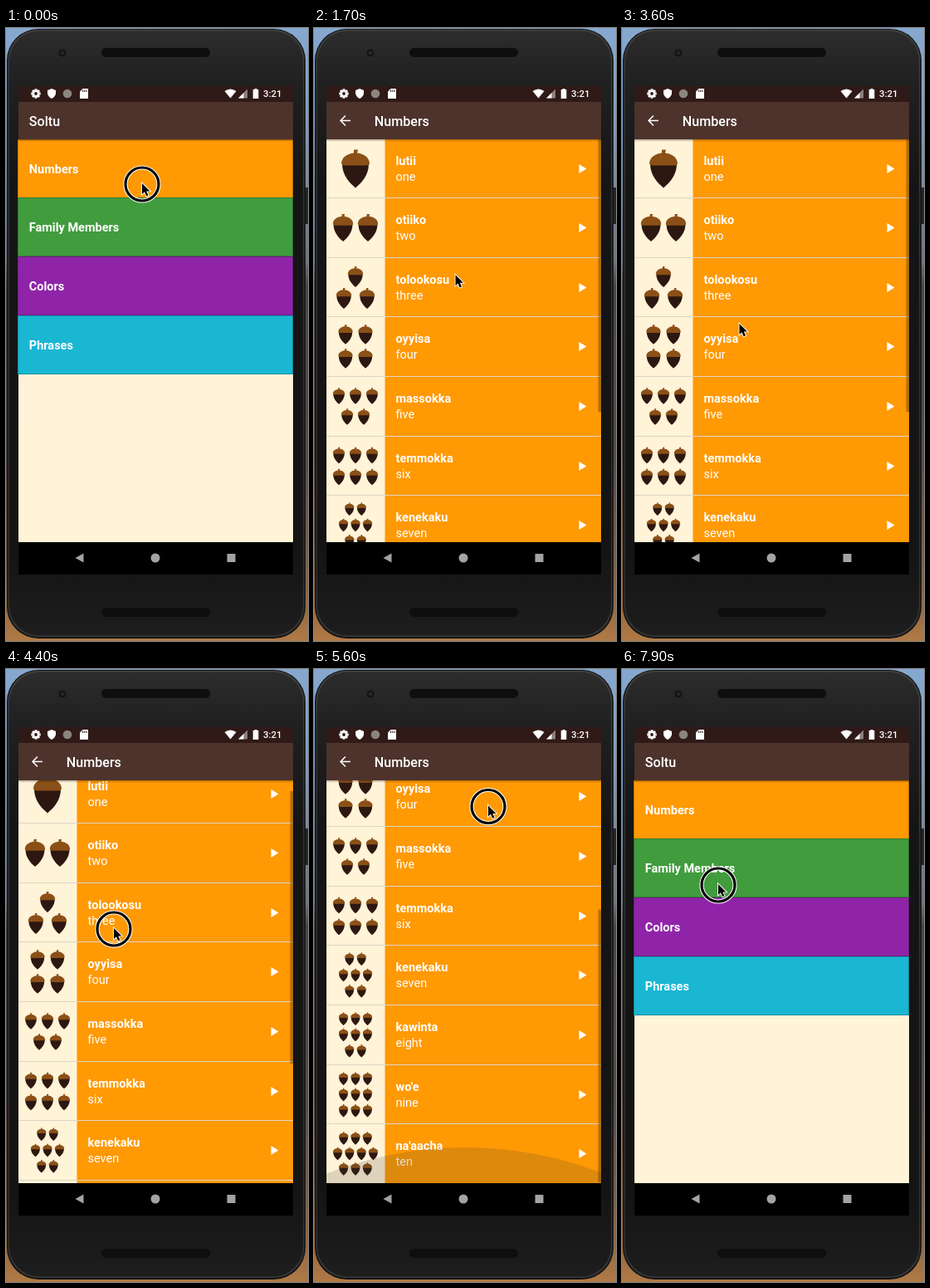
Recreate the animation shown at these times as an HTML page with a canvas. Size 364 px wide and 738 px high, loop 8 s.

```html
<!DOCTYPE html>
<html lang="en">
<head>
<meta charset="utf-8">
<title>Vocabulary app</title>
<style>
html, body { margin: 0; width: 100%; height: 100%; overflow: hidden; background: #1b1b1b; }
canvas { display: block; width: 364px; height: 738px; }
</style>
</head>
<body>
<canvas id="stage"></canvas>
<script>
const W = 364, H = 738, LOOP = 8000, STEP = 100;
const canvas = document.getElementById('stage');
const dpr = window.devicePixelRatio || 1;
canvas.width = W * dpr;
canvas.height = H * dpr;
const c = canvas.getContext('2d');

// Screen geometry
const LEFT = 15, RIGHT = 346, WIDTH = RIGHT - LEFT;
const STATUS = 70, BAR = 89, TOP = 134, BOTTOM = 619, END = 658;
const ROW = 71.65, VIEW = BOTTOM - TOP;
const ORANGE = '#ff9904', CREAM = '#fff3d8';

const menu = [
  ['Numbers', ORANGE], ['Family Members', '#419c3e'],
  ['Colors', '#9024a9'], ['Phrases', '#1ab7d3']
];

// word, meaning, acorns per line, acorn height, column pitch, line pitch
const words = [
  ['lutii', 'one', '1', 46, 0, 0],
  ['otiiko', 'two', '2', 33, 30, 0],
  ['tolookosu', 'three', '12', 25, 28, 26],
  ['oyyisa', 'four', '22', 23.5, 24, 29],
  ['massokka', 'five', '32', 19.5, 20, 25],
  ['temmokka', 'six', '33', 19.5, 20, 26],
  ['kenekaku', 'seven', '232', 15.5, 14.5, 19.3],
  ['kawinta', 'eight', '332', 15.5, 14.5, 19.3],
  ["wo'e", 'nine', '333', 15.5, 14.5, 19.3],
  ["na'aacha", 'ten', '343', 15.5, 14.3, 18.5]
];

// time, pointer x, pointer y
const path = [
  [0, 164, 187], [1100, 164, 187], [2200, 176, 389], [3000, 176, 389],
  [3800, 130, 345], [4150, 130, 340], [4400, 130, 312], [4800, 128, 215],
  [5200, 210, 300], [5300, 210, 290], [5600, 210, 164.5], [6150, 210, 166],
  [6350, 208, 172], [6500, 190, 175], [6800, 62, 169], [7000, 37, 113],
  [7300, 37, 113], [7750, 116, 259], [8000, 116, 259]
];
const presses = [[0, 200], [2400, 2600], [4150, 4800], [5300, 5800],
  [6150, 6350], [7000, 7200], [7800, 8000]];
const scrolls = [[0, 0], [4200, 0], [4400, 19], [4800, 115], [5300, 160],
  [5500, 222], [5600, 230], [6150, 230], [6350, 226], [8000, 226]];

const clamp = v => Math.max(0, Math.min(1, v));
const span = (t, a, b) => clamp((t - a) / (b - a));

function along(keys, t, col) {
  const i = Math.max(1, keys.findIndex(k => k[0] > t));
  const a = keys[i - 1], b = keys[i];
  return a[col] + (b[col] - a[col]) * span(t, a[0], b[0]);
}

function rect(x, y, w, h, fill) {
  c.fillStyle = fill;
  c.fillRect(x, y, w, h);
}

function round(x, y, w, h, r, fill) {
  c.beginPath();
  c.roundRect(x, y, w, h, r);
  c.fillStyle = fill;
  c.fill();
}

function disc(x, y, r, fill) {
  c.beginPath();
  c.arc(x, y, r, 0, 7);
  c.fillStyle = fill;
  c.fill();
}

function shape(d, x, y, fill, scale = 1) {
  c.save();
  c.translate(x, y);
  c.scale(scale, scale);
  c.fillStyle = fill;
  c.fill(new Path2D(d));
  c.restore();
}

function text(str, x, y, size, weight, fill = '#fff') {
  c.font = `${weight} ${size}px Roboto, sans-serif`;
  c.fillStyle = fill;
  c.fillText(str, x, y);
}

function fade(x0, y0, x1, y1, ...stops) {
  const g = c.createLinearGradient(x0, y0, x1, y1);
  stops.forEach(([at, color]) => g.addColorStop(at, color));
  return g;
}

function clipTo(x, y, w, h, draw) {
  c.save();
  c.beginPath();
  c.rect(x, y, w, h);
  c.clip();
  draw();
  c.restore();
}

function drawPhone() {
  rect(0, 0, W, H, fade(0, 0, 0, H, [0, '#86a8cf'], [.13, '#7f9fc4'], [.38, '#6c7482'],
    [.42, '#4a4547'], [.7, '#594a44'], [.93, '#8d6643'], [1, '#b07a45']));
  round(1, 1, 360, 734, 38, '#141414');
  round(2.5, 2, 357, 731, 37, fade(0, 0, 0, H, [0, '#454545'], [.1, '#333'], [.9, '#2e2e2e'], [1, '#3a3a3a']));
  round(4, 3.5, 354, 728, 36, fade(0, 4, 0, H, [0, '#2c2c2c'], [.09, '#202020'],
    [.25, '#151515'], [.85, '#141414'], [1, '#1e1e1e']));
  rect(361, 192, 3, 44, '#232427');
  [24, 698].forEach(y => round(115, y, 131, 11, 5.5, '#0e0e0e'));
  disc(68, 30, 4.5, '#141416');
  disc(68, 30, 2.3, '#26272c');
  rect(LEFT, STATUS, WIDTH, END - STATUS, '#000');
}

function drawBars(title, x) {
  rect(LEFT, STATUS, WIDTH, BAR - STATUS, '#2f1a17');
  rect(LEFT, BAR, WIDTH, TOP - BAR, '#4d332c');
  rect(LEFT, TOP, WIDTH, 3, fade(0, TOP, 0, TOP + 3, [0, 'rgba(0,0,0,.3)'], [1, 'rgba(0,0,0,0)']));
  text(title, x, 117.5, 16.1, 500);
}

function drawMenu() {
  rect(LEFT, TOP, WIDTH, VIEW, CREAM);
  menu.forEach(([label, color], i) => {
    const y = Math.floor(TOP + i * 70.75);
    rect(LEFT - 1, y, WIDTH + 1, 71, color);
    c.lineWidth = 1;
    c.strokeStyle = 'rgba(0,0,0,.22)';
    c.strokeRect(LEFT - .5, y + .5, WIDTH, 70);
    text(label, 27.8, y + 41, 14.5, 700);
  });
  drawBars('Soltu', 27.8);
}

function acorn(x, y, h) {
  const s = h / 46;
  shape('M-16-6H16C16 8 7 17 0 23C-7 17-16 8-16-6Z', x, y, '#2d1711', s);
  shape('M-2-23H3L2-19C11-18 17-13 17-6Q16-4 13-4H-13Q-16-4-17-6C-17-13-11-18-2-19Z', x, y, '#8b5017', s);
}

function drawAcorns(lines, h, dx, dy, y) {
  [...lines].forEach((n, line) => {
    const cy = y + 35.5 + (line - (lines.length - 1) / 2) * dy;
    for (let i = 0; i < n; i++) acorn(50 + (i - (n - 1) / 2) * dx, cy, h);
  });
}

function drawRipple(t, y) {
  const out = 1 - span(t, 2800, 3200);
  if (t < 2500 || !out) return;
  clipTo(LEFT, y, WIDTH, ROW - .8, () => {
    rect(LEFT, y, WIDTH, ROW, `rgba(70,60,20,${.08 * out})`);
    disc(176, y + 39, 37 + Math.max(-20, (t - 2700) * (t > 2700 ? .45 : .12)), `rgba(70,60,20,${.1 * out})`);
  });
}

function drawList(t) {
  const scroll = along(scrolls, t, 1);
  rect(LEFT, TOP, WIDTH, VIEW, ORANGE);
  clipTo(LEFT, TOP, WIDTH, VIEW, () => {
    words.forEach(([word, meaning, lines, h, dx, dy], i) => {
      const y = Math.floor(TOP + i * ROW - scroll);
      if (y > BOTTOM || y + ROW < TOP) return;
      rect(LEFT, y, 70.5, 72, CREAM);
      drawAcorns(lines, h, dx, dy, y);
      text(word, 98.5, y + 31, 14.5, 700);
      text(meaning, 98.5, y + 50, 14.5, 400);
      shape('M0-5.6L9 0L0 5.6Z', 319.5, y + 35.5, '#fff');
      if (i) rect(LEFT, y - 1, WIDTH, 1, '#ddd5c3');
      if (i === 3) drawRipple(t, y);
    });
    const glow = span(t, 5400, 5600) * (1 - span(t, 5800, 6200));
    if (glow) disc(182, BOTTOM - 43 * glow + 457, 457, `rgba(70,60,50,${.18 * glow})`);
    const total = ROW * words.length;
    rect(342.5, TOP + scroll * VIEW / total, 3.5, VIEW * VIEW / total, 'rgba(90,60,20,.45)');
  });
  drawBars('Numbers', 72.8);
  shape('M6.5-.8H-3.6L1-5.4L-.1-6.5L-6.5 0L-.1 6.5L1 5.4L-3.6.8H6.5Z', 37.5, 111.5, '#fff');
}

function drawListWindow(t) {
  const enter = span(t, 700, 1050), leave = span(t, 7200, 7500);
  if (!enter || leave === 1) return;
  c.save();
  c.globalAlpha = span(t, 700, 900) * (1 - leave);
  if (c.globalAlpha === 1) rect(LEFT - 1, TOP, 1, VIEW, '#111');
  c.translate(0, 47 * ((1 - enter) ** 3 + leave * leave));
  drawList(t);
  c.restore();
}

function drawStatus() {
  const y = 79;
  for (let i = 0; i < 4; i++) {
    c.save();
    c.translate(36, y);
    c.rotate(i * Math.PI / 4);
    rect(-1.5, -5.7, 3, 11.4, '#fff');
    c.restore();
  }
  disc(36, y, 4.3, '#fff');
  disc(36, y, 1.9, '#2f1a17');
  shape('M0-6L5-4V0Q4 4 0 6Q-4 4-5 0V-4Z', 55, y, '#fff');
  disc(74, y, 5.3, '#8b8580');
  shape('M-1.5-6H5V6H-5V-2.5Z', 94, y, '#fff');
  [-.5, 1.7, 3.9].forEach(x => rect(93 + x - .4, 74.5, 1, 2.5, '#2f1a17'));
  shape('M0 5.5L-7-3Q0-8 7-3Z', 270.5, y, '#fff');
  shape('M-5.5 5.5H5.5V-5.5Z', 285.5, y, '#8c807d');
  shape('M-5.5 5.5H1V-1Z', 285.5, y, '#fff');
  shape('M-1.5-6H1.5V-5H3.3V6H-3.3V-5H-1.5Z', 301, y, '#fff');
  text('3:21', 310, 83.2, 11.4, 500);
}

function drawNav() {
  shape('M-5 0L5-5.5V5.5Z', 88.5, 638, '#a3a3a3');
  disc(180, 638, 5.5, '#a3a3a3');
  rect(266.5, 633, 10, 10, '#a3a3a3');
}

function drawPointer(t) {
  const x = along(path, t, 1), y = along(path, t, 2);
  if (presses.some(([a, b]) => t >= a && t < b)) {
    c.beginPath();
    c.arc(x, y + 1, 20, 0, 7);
    [[5.2, '#fff'], [3.2, '#000']].forEach(([w, color]) => {
      c.lineWidth = w;
      c.strokeStyle = color;
      c.stroke();
    });
  }
  const arrow = new Path2D('M0 0V14.5L3.3 11.4L5.7 17L8.3 15.9L5.9 10.5H10.5Z');
  c.save();
  c.translate(x, y);
  c.scale(.9, .9);
  c.lineWidth = 2;
  c.strokeStyle = '#fff';
  c.stroke(arrow);
  c.fillStyle = '#000';
  c.fill(arrow);
  c.restore();
}

const start = performance.now();
function frame() {
  const now = (performance.now() - start) % LOOP;
  const t = Math.floor(now / STEP) * STEP;
  c.setTransform(dpr, 0, 0, dpr, 0, 0);
  drawPhone();
  clipTo(LEFT - 1, STATUS, WIDTH + 1, END - STATUS, () => {
    drawMenu();
    drawListWindow(t);
    drawStatus();
    drawNav();
  });
  drawPointer(t);
  requestAnimationFrame(frame);
}
frame();
</script>
</body>
</html>
```
